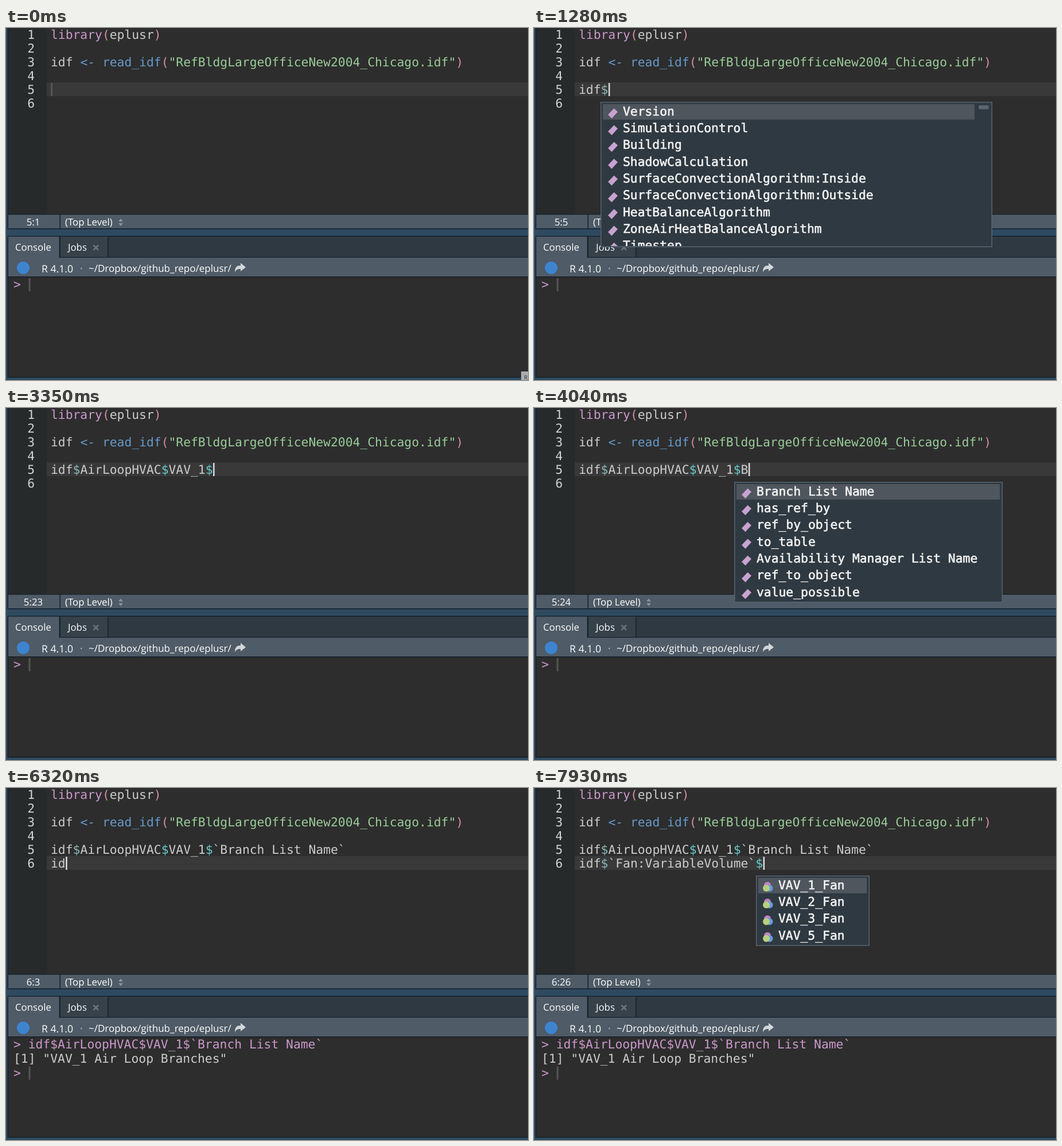
Animation, 910 px wide and 615 px high, one loop 8000 ms. Source, as an HTML page:

```html
<!DOCTYPE html>
<html lang="en">
<head>
<meta charset="utf-8">
<title>Completing IDF names in R</title>
<style>
  html, body { margin: 0; width: 100%; height: 100%; overflow: hidden; background: #2f4a60; }
  svg { display: block; width: 910px; height: 615px; }
  text { white-space: pre; text-rendering: geometricPrecision; }
  .code { font: 21.333px "DejaVu Sans Mono", monospace; fill: #ccc; }
  .num { fill: #d0d2d4; text-anchor: end; }
  .ui { font: 16.8px "Open Sans", sans-serif; fill: #fff; }
  .key { fill: #c9c; }
  .fn { fill: #69c; }
  .str { fill: #9c9; }
  .par { fill: #d48ca6; }
  .op { fill: #6cc; }
  .first { fill: #86b8b8; }
  .item { fill: #f4f4f4; stroke: #f4f4f4; stroke-width: .6px; }
</style>
</head>
<body>
<svg viewBox="0 0 910 615">
  <!-- editor pane -->
  <path fill="#14212c" d="M2.500 0H910V351.500H2.500Z"/>
  <path fill="#2d2d2d" d="M4 0H910V325H4Z"/>
  <path fill="#272a2a" d="M4 0H71V325H4Z"/>
  <rect id="active" x="71" width="839" height="24" fill="#393939"/>
  <g id="nums" class="code"></g>
  <text class="code" x="78" y="19"><tspan class="key">library</tspan><tspan class="par">(</tspan>eplusr<tspan class="par">)</tspan></text>
  <text class="code" x="78" y="67">idf <tspan class="fn">&lt;- read_idf</tspan><tspan class="par">(</tspan><tspan class="str">"RefBldgLargeOfficeNew2004_Chicago.idf"</tspan><tspan class="par">)</tspan></text>
  <text id="line5" class="code" x="78" y="115"></text>
  <text id="line6" class="code" x="78" y="139"></text>
  <rect id="caret" width="2.500" height="23"/>

  <!-- status bar -->
  <path fill="#4f5b66" d="M4 326.300H93.500V350H4ZM95 326.300H910V350H95Z"/>
  <text id="pos" class="ui" x="47.5" y="345" text-anchor="middle"></text>
  <text class="ui" x="103" y="345">(Top Level)</text>
  <path fill="#8d959b" d="M196 338L200 333 204 338ZM196 341H204L200 346Z"/>

  <!-- console pane -->
  <path fill="#14212c" d="M2.500 366Q2.500 363 5.500 363H910V611H2.500Z"/>
  <path fill="#2f3941" d="M4 364.500H910V400H4Z"/>
  <path fill="#14212c" d="M92.500 364.500H178.500V400H92.500Z"/>
  <path fill="#36414a" d="M95 364.500H177V400H95Z"/>
  <path fill="#4f5b66" d="M4 364.500H92.500V401.300H910V434H4Z"/>
  <path fill="#2d2d2d" d="M4 435.500H910V609.500H4Z"/>
  <text class="ui" x="16" y="389">Console</text>
  <text class="ui" x="108" y="389">Jobs</text>
  <path d="M152.500 379.500L161 388M161 379.500L152.500 388" stroke="#69757d" stroke-width="2.500"/>
  <circle cx="30" cy="419" r="11" fill="#3d84cf"/>
  <text class="ui" x="62" y="427" style="font-size:17.600px">R 4.1.0</text>
  <text class="ui" x="129" y="426" fill-opacity=".7">·</text>
  <text class="ui" x="144" y="426" style="font-size:17px">~/Dropbox/github_repo/eplusr/</text>
  <path fill="#d2d6d9" d="M399 427C399 418 402 415 409 415V410.500L418 418 409 425V421C404 421 401 422 399 427Z"/>
  <g id="output" class="code">
    <text x="13" y="455" class="key">&gt; idf$AirLoopHVAC$VAV_1$`Branch List Name`</text>
    <text x="13" y="480">[1] "VAV_1 Air Loop Branches"</text>
  </g>
  <g id="prompt">
    <text x="13" y="455" class="code key">&gt;</text>
    <rect x="39.500" y="437" width="3" height="23" fill="#555"/>
  </g>

  <g id="corner">
    <path fill="#a9adb0" d="M898 600H910V615H898Z"/>
    <text x="903" y="614" font-family="Open Sans, sans-serif" font-size="10" fill="#333">R</text>
  </g>
  <clipPath id="clip"><rect id="clipBox"/></clipPath>
  <g id="popup"></g>
</svg>
<script>
const LOOP = 8000, CHAR = 21.333 * 0.60205, LEFT = 78, ITEM = 29.3;
const POPUP_LEFT = 64.6, POPUP_CHAR = 12.93; // popups step on a slightly wider pitch
const $ = id => document.getElementById(id);
const put = (el, attrs) => { for (const k in attrs) el.setAttribute(k, attrs[k]); };
const list = (names, width, opts) => ({ names: names.split("|"), width, ...opts });

const scroll = { scroll: true }, dots = { dots: true };
const vars = list("idf|Idf|idf_object|IdfObject|IdfScalar|IdfViewer|idf_to_string|is_idf|is_idfobject", 399, scroll);
const classes = list("Version|SimulationControl|Building|ShadowCalculation|SurfaceConvectionAlgorithm:Inside|SurfaceConvectionAlgorithm:Outside|HeatBalanceAlgorithm|ZoneAirHeatBalanceAlgorithm|Timestep", 683, scroll);
const air = list("AirLoopHVAC|AirLoopHVAC:ControllerList|AirLoopHVAC:OutdoorAirSystem|AirLoopHVAC:ReturnPath|AirLoopHVAC:ReturnPlenum|AirLoopHVAC:SupplyPath|AirLoopHVAC:ZoneSplitter|ZoneAirHeatBalanceAlgorithm|AvailabilityManager", 683, scroll);
const loops = list("VAV_1|VAV_2|VAV_3|VAV_5", 145, dots);
const fields = list("Name|Controller List Name|Availability Manager List Name|Design Supply Air Flow Rate|Branch List Name|Connector List Name|Supply Side Inlet Node Name|Demand Side Outlet Node Name|Demand Side Inlet Node Names", 516, scroll);
const withB = list("Branch List Name|has_ref_by|ref_by_object|to_table|Availability Manager List Name|ref_to_object|value_possible", 468);
const withBr = list("Branch List Name|Availability Manager List Name", 468);
const withF = list("Fan:VariableVolume|FenestrationSurface:Detailed|SurfaceConvectionAlgorithm:Inside|SurfaceConvectionAlgorithm:Outside|BuildingSurface:Detailed|DesignSpecification:OutdoorAir|OutputControl:Table:Style|SetpointManager:MixedAir|Sizing:Parameters", 683, scroll);
const fans = list("VAV_1_Fan|VAV_2_Fan|VAV_3_Fan|VAV_5_Fan", 198, dots);

const WHITE = "#dcdcdc", GREY = "#5c5c5c", NONE = "none";
const LOOP_OBJ = "idf$AirLoopHVAC", VAV = LOOP_OBJ + "$VAV_1", BRANCH = VAV + "$`Branch List Name`";
const FAN = "idf$`Fan:VariableVolume`";

// [start ms, editor line, its text, popup, caret colour]
const steps = [
  [0, 5, "", null, GREY],
  [660, 5, "", null, "#a0a0a0"],
  [760, 5, ""],
  [930, 5, "i"],
  [980, 5, "id"],
  [1030, 5, "idf"],
  [1080, 5, "idf", vars],
  [1280, 5, "idf$", classes],
  [1780, 5, "idf$A", air],
  [1830, 5, "idf$Ai", air],
  [1930, 5, "idf$Air", air],
  [2390, 5, LOOP_OBJ],
  [2640, 5, LOOP_OBJ + "$"],
  [2690, 5, LOOP_OBJ + "$", loops],
  [3150, 5, VAV],
  [3350, 5, VAV + "$"],
  [3400, 5, VAV + "$", fields],
  [3940, 5, VAV + "$B", fields],
  [4040, 5, VAV + "$B", withB],
  [4260, 5, VAV + "$Br", withBr],
  [4900, 5, VAV + "$Br"],
  [4950, 5, BRANCH],
  [5560, 5, BRANCH, null, NONE],
  [5810, 6, ""],
  [6270, 6, "i"],
  [6320, 6, "id"],
  [6380, 6, "idf"],
  [6420, 6, "idf", vars],
  [6620, 6, "idf$", classes],
  [6920, 6, "idf$F", withF],
  [7530, 6, "idf$F"],
  [7630, 6, FAN],
  [7930, 6, FAN + "$", fans]
];

const tint = code => {
  let n = 0;
  return code.replace(/\$/g, () => `<tspan class="${n++ ? "op" : "first"}">$</tspan>`);
};

const icon = (x, y, dots) => dots
  ? `<circle cx="${x + 20}" cy="${y - 3}" r="6" fill="#c084c4"/><circle cx="${x + 23.5}" cy="${y + 2}" r="6" fill="#679bdc"/><circle cx="${x + 18}" cy="${y + 2}" r="6" fill="#b9cf7e"/>`
  : `<path fill="#c8a2d0" d="M${x + 13} ${y + 2.5}l10.500 -11 6.500 6 -10.500 11.500z"/>`;

function drawPopup(p, line, code) {
  if (!p) return "";
  const token = code.lastIndexOf("$") + 1;
  const x = Math.floor(POPUP_LEFT + token * POPUP_CHAR), y = 24 * line + 9;
  const h = p.scroll ? 254 : Math.round(p.names.length * ITEM + 6);
  const box = (dx, dy, w, bh, rest) => `<rect x="${x + dx}" y="${y + dy}" width="${w}" height="${bh}" ${rest}/>`;
  put($("clipBox"), { x, y, width: p.width, height: h - 2 });
  const rows = p.names.map((name, i) => {
    const mid = y + 18 + i * ITEM;
    return icon(x, mid + 2, p.dots) + `<text class="code item" x="${x + 39}" y="${mid + 5.8}">${name}</text>`;
  });
  return box(.75, .75, p.width - 1.5, h - 1.5, 'fill="#2f3941" stroke="#566572" stroke-width="1.5"')
    + box(4, 4, p.width - (p.scroll ? 35 : 9), 27, 'fill="#4f565e"')
    + (p.scroll ? box(p.width - 24, 6, 18, 7, 'rx="3" fill="#596671"') : "")
    + `<g clip-path="url(#clip)">${rows.join("")}</g>`;
}

function show([, line, code, popup, color = WHITE]) {
  const top = 24 * line - 25;
  put($("active"), { y: top });
  $("line5").innerHTML = tint(line === 5 ? code : BRANCH);
  $("line6").innerHTML = line === 6 ? tint(code) : "";
  put($("caret"), { x: LEFT + .5 + code.length * CHAR, y: top + 1, fill: color });
  $("pos").textContent = `${line}:${code.length + 1}`;
  $("output").style.display = line === 6 ? "" : "none";
  put($("prompt"), { transform: `translate(0 ${line === 6 ? 49.5 : 0})` });
  $("popup").innerHTML = drawPopup(popup, line, code);
}

$("nums").innerHTML = [1, 2, 3, 4, 5, 6]
  .map(n => `<text class="num" x="50" y="${24 * n - 5}">${n}</text>`).join("");

let current;
const start = performance.now();
function tick() {
  const t = Math.max(0, performance.now() - start) % LOOP;
  const step = steps.findLast(s => s[0] <= t);
  if (step !== current) show(current = step);
  $("corner").style.display = t < 50 ? "" : "none";
  requestAnimationFrame(tick);
}
tick();
</script>
</body>
</html>
```
